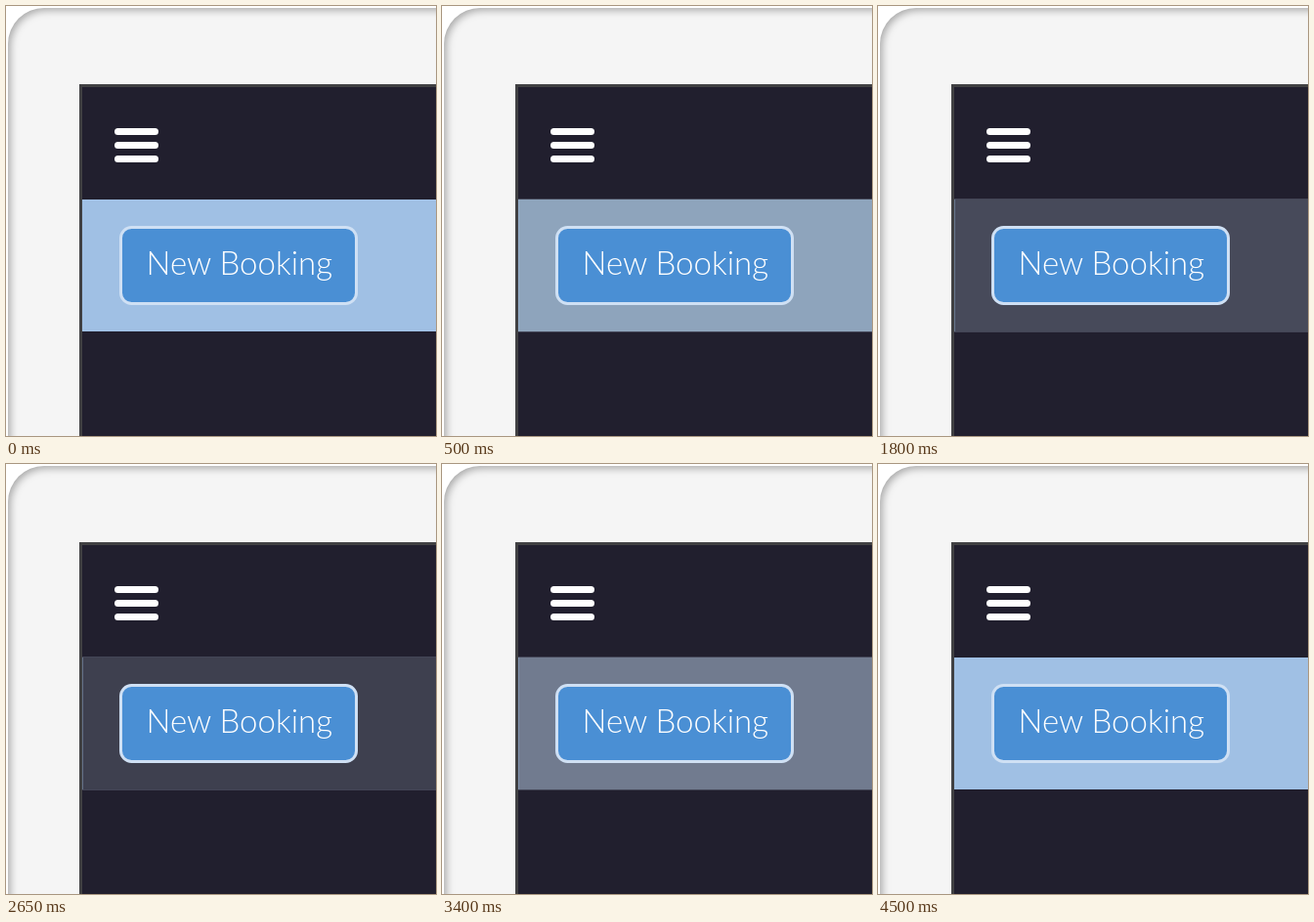
An HTML page for the animation above (5000 ms loop, 440x440 px).

```html
<!DOCTYPE html>
<html lang="en">
<head>
<meta charset="utf-8">
<title>New Booking</title>
<style>
  html, body { margin: 0; width: 100%; height: 100%; overflow: hidden; background: #fff; }
  #stage { position: relative; width: 440px; height: 440px; overflow: hidden; }
  #tablet {
    position: absolute; left: 2px; top: 2px; width: 600px; height: 600px;
    border-radius: 37px; background: #f5f5f5;
    box-shadow: inset 2px 2px 8px rgba(0, 0, 0, .35);
  }
  svg { position: absolute; left: 0; top: 0; display: block; }
  text { font: 300 33px Lato, "Open Sans", sans-serif; fill: #fff; }
</style>
</head>
<body>
<div id="stage">
  <div id="tablet"></div>
  <svg width="440" height="440" viewBox="0 0 440 440">
    <rect x="75" y="80" width="400" height="400" fill="#414143"/>
    <rect x="78" y="83" width="400" height="400" fill="#211f2e"/>
    <g fill="#fff">
      <rect x="111" y="125" width="45" height="7" rx="3.5"/>
      <rect x="111" y="139" width="45" height="7" rx="3.5"/>
      <rect x="111" y="153" width="45" height="7" rx="3.5"/>
    </g>
    <rect id="band" x="78" y="198" width="362" height="135"/>
    <g id="edge">
      <path d="M78 197.5H440M78 333.5H440" stroke="#434556"/>
      <path d="M78.5 198V333" stroke="#a0c0e4" stroke-opacity=".4"/>
    </g>
    <rect x="117.5" y="226.5" width="241" height="78" rx="11" fill="#4a8fd4" stroke="#cfe0f4" stroke-width="3"/>
    <text x="143.5" y="275">New Booking</text>
  </svg>
</div>
<script>
  const LOOP = 5000, STEP = 50;
  const band = document.getElementById('band');
  const edge = document.getElementById('edge');

  // time in ms, then the band colour
  const keys = [
    [0, 160, 192, 228],
    [500, 142, 164, 188],
    [1100, 111, 122, 142],
    [1950, 62, 64, 79],
    [2650, 62, 64, 79],
    [2750, 74, 78, 94],
    [3400, 113, 123, 143],
    [4500, 160, 192, 228],
    [LOOP, 160, 192, 228]
  ];

  function colourAt(t) {
    const i = keys.findIndex(k => k[0] > t);
    const a = keys[i - 1], b = keys[i];
    const u = (t - a[0]) / (b[0] - a[0]);
    return [1, 2, 3].map(c => Math.round(a[c] + (b[c] - a[c]) * u));
  }

  function draw(time) {
    const t = Math.floor((time % LOOP) / STEP) * STEP;
    const rgb = colourAt(t);
    band.setAttribute('fill', `rgb(${rgb})`);
    edge.setAttribute('opacity', Math.min(1, (160 - rgb[0]) / 18));
  }

  const start = performance.now();
  function tick() {
    draw(performance.now() - start);
    requestAnimationFrame(tick);
  }
  tick();
</script>
</body>
</html>
```
